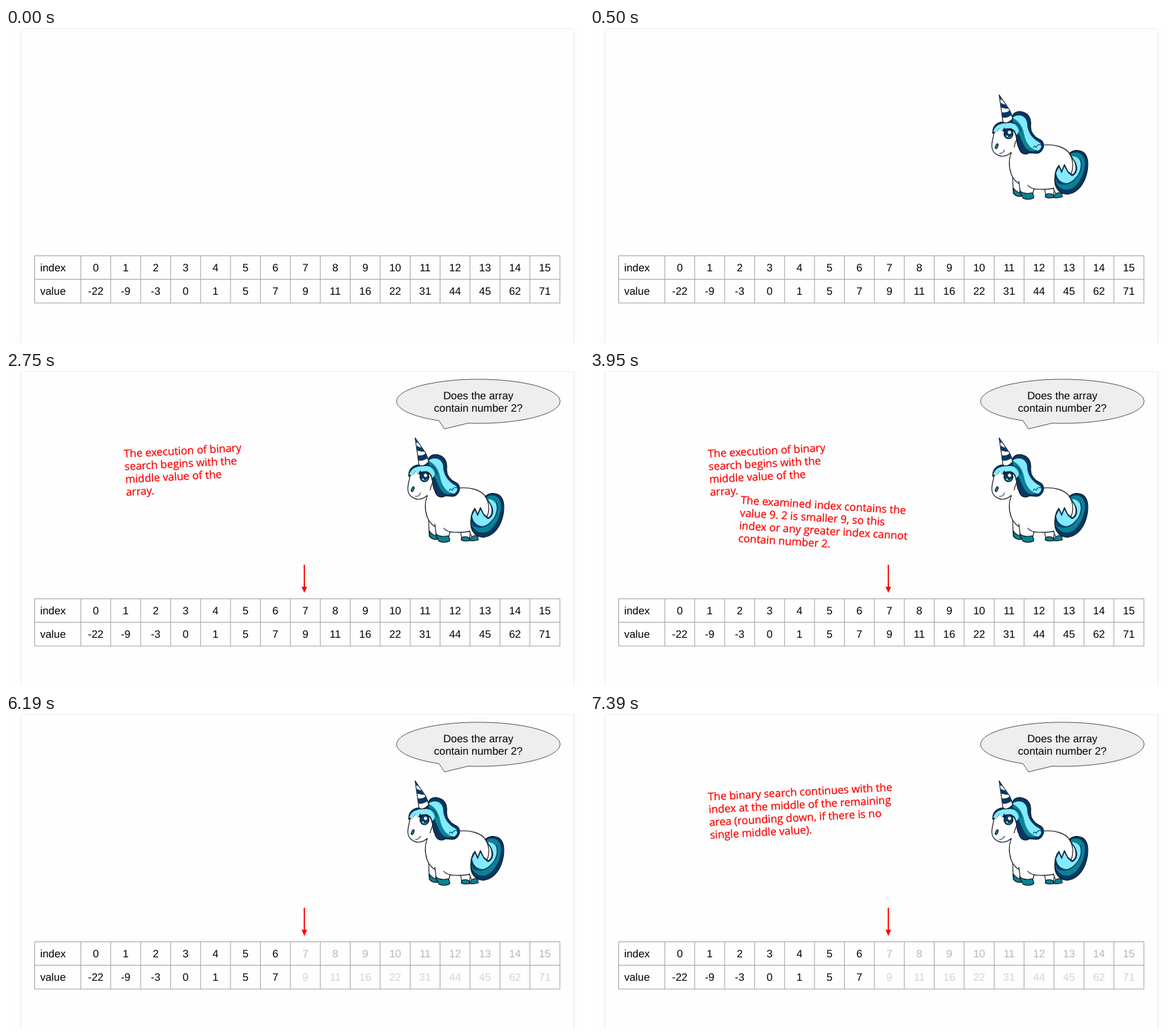
An HTML page for the animation above (8000 ms loop, 837x457 px).

```html
<!DOCTYPE html>
<html lang="en">
<head>
<meta charset="utf-8">
<title>Binary search</title>
<style>
  html, body { margin: 0; width: 100%; height: 100%; overflow: hidden; background: #fefefe; }
  svg { display: block; width: 837px; height: 457px; }
  text { font: 15.5px "Liberation Sans", Arial, sans-serif; text-rendering: geometricPrecision; }
  .mid { text-anchor: middle; }
  .note text { font: 15.6px "Open Sans", sans-serif; fill: #f00; stroke: #f00; stroke-width: .25; }
  .ink { stroke: #101820; stroke-width: 1.1; stroke-linejoin: round; stroke-linecap: round; }
  .white { fill: #fff; }
  .navy { fill: #073763; }
  .teal { fill: #0b8293; }
  .cyan { fill: #83eaff; }
  .none { fill: none; }
</style>
</head>
<body>
<svg viewBox="0 0 837 457">
  <defs>
    <filter id="soft" x="-5%" y="-5%" width="110%" height="110%"><feGaussianBlur stdDeviation="1.1"/></filter>
  </defs>
  <rect x="22" y="1" width="800" height="480" rx="2" fill="#ccc" filter="url(#soft)"/>
  <rect x="22" y="1" width="800" height="480" rx="2" fill="#fefefe"/>

  <g id="table"></g>

  <g id="unicorn" data-from="500">
    <!-- far legs and hooves -->
    <path class="white ink" d="M612 217L613 240Q618 246 626 243L628 225M658 231L660 244Q664 248 671 245L673 230"/>
    <path class="teal ink" d="M613 232Q617 238 623 239L625 244Q617 245 614 240ZM661 241Q666 239 671 242L671 246Q664 248 659 245Z"/>
    <!-- body -->
    <path class="white ink" d="M612 178C606 187 606 201 610 212C615 226 632 234 651 234C673 235 689 229 694 217C700 207 701 194 695 183C688 172 672 168 654 170L630 174Z"/>
    <path class="white" d="M621 223L624 242L642 241L643 229ZM671 228L673 240L684 239L683 225Z"/>
    <path class="none ink" d="M621 222L623 238M643 233L641 241M634 228Q637 232 643 233M671 232L674 240M683 230L684 240"/>
    <path class="teal ink" d="M622 236Q629 242 640 239Q644 244 642 247Q634 250 627 247ZM674 241Q679 237 683 240L684 245Q677 247 671 246Z"/>
    <!-- tail -->
    <path class="navy ink" d="M694 182C699 177 708 176 714 180C721 185 722 196 720 208C717 224 708 238 693 241C680 242 672 232 673 218C673 210 675 204 679 199L683 208L687 198L692 208L698 213C705 210 706 199 699 190Z"/>
    <path class="teal" d="M696 183C704 178 713 181 716 190C719 203 712 221 702 230C690 239 677 234 674 220C681 228 692 227 699 219C710 209 710 193 698 188Z"/>
    <path class="cyan" d="M698 186C707 186 712 193 711 202C710 214 701 224 691 225C682 225 676 219 675 210L679 202L683 211L687 201L692 210L698 215C707 212 708 199 700 190Z"/>
    <path class="none" stroke="#073763" stroke-width="1.4" d="M676 223C685 230 697 226 704 217C711 210 713 198 710 190"/>
    <!-- head -->
    <path class="white ink" d="M585 147C586 157 581 163 582 173C583 181 590 186 598 186C608 185 614 178 615 169L622 151L608 134Z"/>
    <path class="white" d="M606 176L620 171L630 178L613 183Z"/>
    <ellipse class="teal ink" cx="589" cy="171.5" rx="1.6" ry="3.8" transform="rotate(22 589 171.5)"/>
    <path class="none ink" d="M593 182Q599 182 600 177"/>
    <!-- mane -->
    <path class="navy ink" d="M583 153C583 143 588 137 598 136L610 132C612 123 619 119 627 122C637 125 639 133 638 143C638 151 643 158 650 161C658 164 659 173 653 179C648 184 642 181 636 181C629 186 623 181 621 174C617 167 619 157 614 150C609 147 605 145 599 150L594 144L589 150Z"/>
    <path class="teal" d="M612 131C620 123 629 128 629 138C628 149 630 160 636 169C640 175 644 176 649 175C642 182 632 178 629 171C623 161 622 151 614 145Z"/>
    <path class="cyan" d="M612 130C621 123 632 128 633 138C633 150 640 160 649 165C655 168 655 174 649 178C640 177 634 170 631 162C627 152 629 140 612 130Z"/>
    <path class="cyan" d="M584 150C588 139 597 138 607 138C614 137 619 142 621 149Q620 154 617 155C617 149 612 146 608 145L604 151L600 144L596 151L593 145L588 152Z"/>
    <path class="none" stroke="#073763" stroke-width="1.1" d="M611 138C619 136 623 143 624 150M642 174Q643 169 646 173Q649 167 654 170"/>
    <!-- eye -->
    <path class="none ink" stroke-width="1.5" d="M598 149Q605 143 613 149"/>
    <ellipse class="navy ink" cx="606" cy="153.5" rx="6.6" ry="7.2"/>
    <path class="teal" d="M601 155Q606 161 611 155Q610 160 606 160Q602 159 601 155Z"/>
    <circle class="white" cx="607.5" cy="151.5" r="2.4"/>
    <circle class="cyan" cx="604" cy="157" r="1.2"/>
    <!-- horn -->
    <path class="white ink" d="M592.5 97L598 136Q603 141 612 132Q611 125 607 118Z"/>
    <path class="navy" d="M592.5 97L593.2 103Q595 104 597 105ZM594 108Q599 111 602 111L606 117Q599 117 595 115ZM596 122Q603 124 608 119L611 126Q605 131 597.3 130Z"/>
  </g>

  <g data-from="1700">
    <path fill="#eee" stroke="#595959" d="M627 72A118.3 32 0 1 1 669 75.7L635 84Z"/>
    <text class="mid" x="684" y="41">Does the array</text>
    <text class="mid" x="684" y="59">contain number 2?</text>
  </g>

  <path data-from="2750" fill="#f00" d="M431.1 281h1.8v33h-1.8ZM428 313h8L432 322Z"/>
  <g id="notes"></g>
</svg>

<script>
const LOOP = 8000, DIM_AT = 5140;
const values = [-22, -9, -3, 0, 1, 5, 7, 9, 11, 16, 22, 31, 44, 45, 62, 71];
const get = id => document.getElementById(id);

function add(parent, tag, attrs, content = "") {
  const el = document.createElementNS("http://www.w3.org/2000/svg", tag);
  for (const key in attrs) el.setAttribute(key, attrs[key]);
  el.textContent = content;
  parent.append(el);
  return el;
}

function note(from, to, x, y, angle, lines) {
  const g = add(get("notes"), "g", {
    class: "note", "data-from": from, "data-to": to,
    transform: `translate(${x} ${y}) rotate(${angle})`
  });
  lines.forEach((line, i) => add(g, "text", { y: i * 18.5 }, line));
}

// table
const table = get("table"), left = 108.3, cell = 43.36;
let grid = "M41.5 330.5H802.5M41.5 364.5H802.5M41.5 399H802.5M41.5 330.5V399";
for (let i = 0; i <= 16; i++) grid += `M${left + i * cell} 330.5V399`;
add(table, "path", { d: grid, fill: "none", stroke: "#a4a4a4" });
add(table, "text", { x: 49.5, y: 353 }, "index");
add(table, "text", { x: 49.5, y: 387 }, "value");

const dimmed = [];
values.forEach((value, i) => {
  const x = left + (i + 0.5) * cell;
  const top = add(table, "text", { class: "mid", x, y: 353 }, i);
  const low = add(table, "text", { class: "mid", x, y: 387 }, value);
  if (i >= 7) dimmed.push([top, "#b7b7b7"], [low, "#d4d4d4"]);
});

// notes
const compare = [
  "The examined index contains the",
  "value 9. 2 is smaller 9, so this",
  "index or any greater index cannot",
  "contain number 2."
];
note(2750, 6190, 171, 125.5, -3, [
  "The execution of binary", "search begins with the", "middle value of the", "array."
]);
note(3950, 5140, 218, 192.5, 3.6, compare);
note(5140, 6190, 207, 197.5, 3.6, compare);
note(7390, LOOP, 171, 125.5, -3, [
  "The binary search continues with the",
  "index at the middle of the remaining",
  "area (rounding down, if there is no",
  "single middle value)."
]);

const timed = [...document.querySelectorAll("[data-from]")];
const start = performance.now();

function draw(now) {
  const t = Math.max(0, now - start) % LOOP;
  for (const el of timed) {
    const on = t >= +el.dataset.from && t < +(el.dataset.to || LOOP);
    el.style.display = on ? "" : "none";
  }
  for (const [el, color] of dimmed) el.style.fill = t >= DIM_AT ? color : "#000";
  requestAnimationFrame(draw);
}
draw(start);
</script>
</body>
</html>
```
